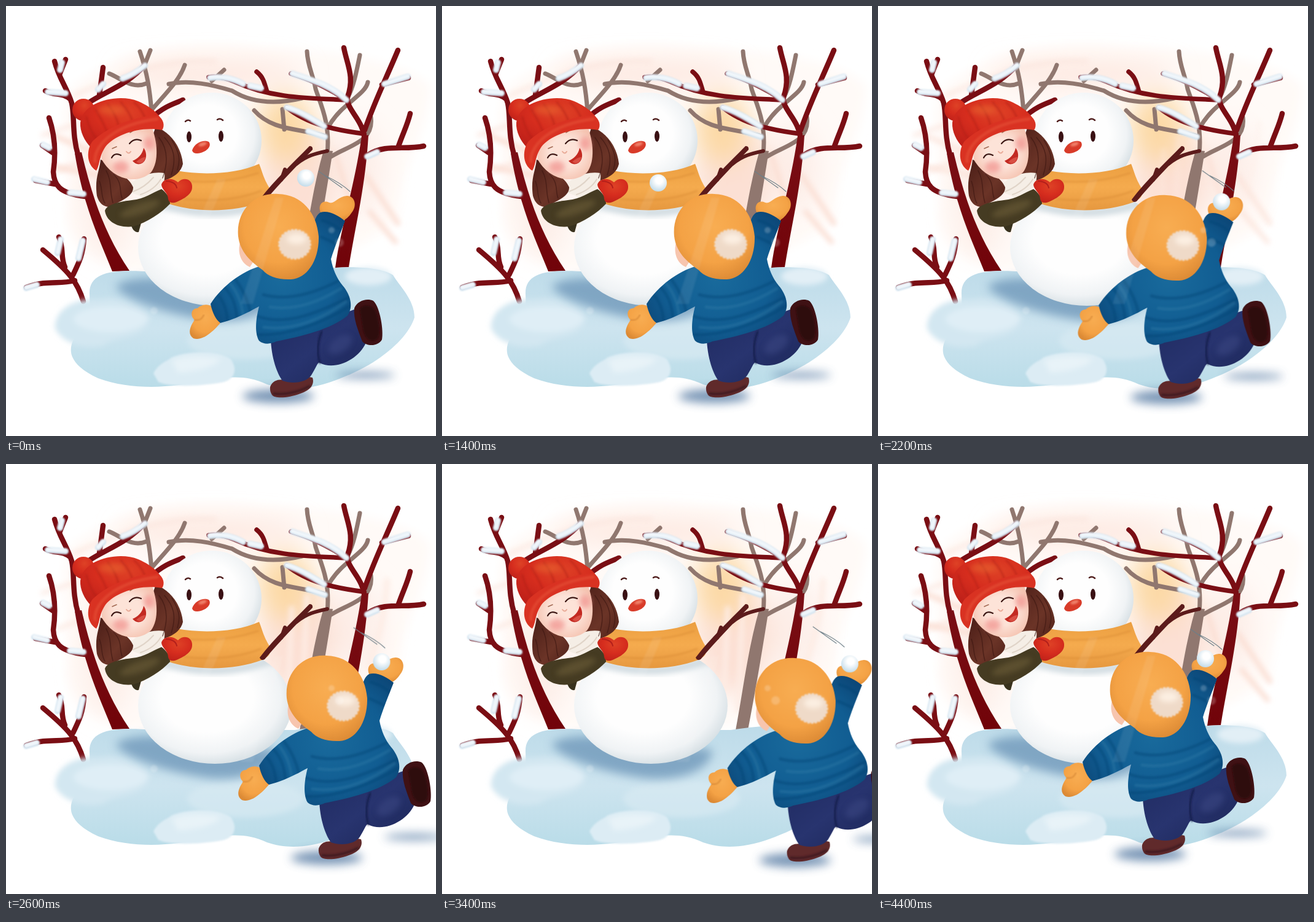
An HTML page that plays this animation: 700x700 px, repeating every 4600 ms.

```html
<!DOCTYPE html>
<html lang="en">
<head>
<meta charset="utf-8">
<title>Snowball fun</title>
<style>
html, body { margin: 0; width: 100%; height: 100%; overflow: hidden; background: #fff; }
svg { display: block; width: 100vw; height: 100vh; }
.line { fill: none; stroke-linecap: round; stroke-linejoin: round; }
.fuzz { filter: url(#b1); }
.blur { filter: url(#b2); }
.soft { filter: url(#b4); }
.softer { filter: url(#b9); }
.haze { filter: url(#b20); }
.boy, .whoosh, .ball, .raysA, .raysB { animation: 4600ms infinite; }
.boy { animation-name: run; }
.whoosh { animation-name: whoosh; }
.ball { animation-name: ball; }
.raysA { animation-name: raysA; }
.raysB { animation-name: raysB; }
/* 200 ms per step: away 2000-3200, back 3200-4400 */
@keyframes run {
  0% { transform: translate(0, 0); animation-timing-function: step-end; }
  43.478%, 95.652%, 100% { transform: translate(0, 0); animation-timing-function: steps(6); }
  69.565% { transform: translate(158px, 12px); animation-timing-function: steps(6); }
}
@keyframes whoosh {
  0% { transform: translate(0, 0); animation-timing-function: step-end; }
  43.478%, 95.652%, 100% { transform: translate(0, 0); animation-timing-function: steps(6); }
  69.565% { transform: translate(114px, -5px); animation-timing-function: steps(6); }
}
@keyframes raysA {
  0%, 43.478%, 95.652%, 100% { opacity: 1; animation-timing-function: steps(3); }
  56.522%, 82.609% { opacity: 0; animation-timing-function: steps(3); }
}
@keyframes raysB {
  0%, 43.478%, 95.652%, 100% { opacity: 0; animation-timing-function: steps(3); }
  56.522%, 82.609% { opacity: 1; animation-timing-function: steps(3); }
}
@keyframes ball {
  0% { transform: translate(488px, 280px); animation-timing-function: step-end; }
  4.348% { transform: translate(439px, 257px); animation-timing-function: step-end; }
  8.696% { transform: translate(390px, 250px); animation-timing-function: step-end; }
  13.043% { transform: translate(341px, 257px); animation-timing-function: step-end; }
  17.391% { transform: translate(292px, 278px); animation-timing-function: step-end; }
  30.435% { transform: translate(352px, 288px); animation-timing-function: step-end; }
  34.783% { transform: translate(412px, 298px); animation-timing-function: step-end; }
  39.13% { transform: translate(473px, 306px); animation-timing-function: step-end; }
  43.478% { transform: translate(533px, 317px); animation-timing-function: steps(6); }
  69.565% { transform: translate(690px, 327px); animation-timing-function: steps(6); }
  95.652% { transform: translate(533px, 317px); animation-timing-function: step-end; }
  100% { transform: translate(488px, 280px); }
}
</style>
</head>
<body>
<svg viewBox="0 0 700 700">
<defs>
  <filter id="b1" x="-10%" y="-10%" width="120%" height="120%"><feGaussianBlur stdDeviation=".8"/></filter>
  <filter id="b2" x="-30%" y="-30%" width="160%" height="160%"><feGaussianBlur stdDeviation="1.8"/></filter>
  <filter id="b4" x="-50%" y="-50%" width="200%" height="200%"><feGaussianBlur stdDeviation="4"/></filter>
  <filter id="b9" x="-60%" y="-80%" width="220%" height="260%"><feGaussianBlur stdDeviation="8"/></filter>
  <filter id="b20" x="-60%" y="-60%" width="220%" height="220%"><feGaussianBlur stdDeviation="20"/></filter>
  <linearGradient id="ice" x1="0" y1="0" x2="0" y2="1"><stop offset="0" stop-color="#bddbe9"/><stop offset=".5" stop-color="#cde4ef"/><stop offset="1" stop-color="#b9dce8"/></linearGradient>
  <radialGradient id="snow" cx=".45" cy=".43" r=".6"><stop offset=".5" stop-color="#fefefe"/><stop offset=".8" stop-color="#f0f3f5"/><stop offset="1" stop-color="#d3dde2"/></radialGradient>
  <radialGradient id="flake" cx=".55" cy=".35" r=".65"><stop offset=".3" stop-color="#fff"/><stop offset="1" stop-color="#c3dcea"/></radialGradient>
  <radialGradient id="skin" cx=".5" cy=".5" r=".55"><stop offset=".5" stop-color="#fde3d8"/><stop offset="1" stop-color="#f5c4b2"/></radialGradient>
  <radialGradient id="red" cx=".55" cy=".3" r=".75"><stop offset="0" stop-color="#de4226"/><stop offset=".5" stop-color="#d62d1e"/><stop offset="1" stop-color="#be2019"/></radialGradient>
  <radialGradient id="orange" cx=".5" cy=".38" r=".65"><stop offset="0" stop-color="#f8ad52"/><stop offset=".65" stop-color="#f4a245"/><stop offset="1" stop-color="#dc8a35"/></radialGradient>
  <linearGradient id="scarf" x1="0" y1="0" x2="0" y2="1"><stop offset="0" stop-color="#eb9e40"/><stop offset=".5" stop-color="#f5ab4e"/><stop offset="1" stop-color="#e6983f"/></linearGradient>
  <radialGradient id="blue" cx=".5" cy=".5" r=".65"><stop offset="0" stop-color="#196a9c"/><stop offset=".6" stop-color="#115d92"/><stop offset="1" stop-color="#0b4474"/></radialGradient>
  <linearGradient id="navy" x1="0" y1="0" x2="1" y2="1"><stop offset="0" stop-color="#1f2a60"/><stop offset=".5" stop-color="#28346f"/><stop offset="1" stop-color="#1b2556"/></linearGradient>
  <linearGradient id="bark" x1="0" y1="0" x2="0" y2="1"><stop offset="0" stop-color="#7a0f15"/><stop offset="1" stop-color="#710309"/></linearGradient>
  <linearGradient id="hair" x1="0" y1="0" x2="1" y2="1"><stop offset="0" stop-color="#4a1d17"/><stop offset=".6" stop-color="#6b3427"/><stop offset="1" stop-color="#4f2119"/></linearGradient>
  <clipPath id="cBody"><ellipse cx="340" cy="393" rx="125" ry="95"/></clipPath>
  <clipPath id="cSweater"><path id="sweater" d="M412 424C385 432 352 455 333 485C336 500 342 511 349 516C370 511 392 500 412 489C406 512 405 533 412 545C420 552 432 550 440 546C480 538 530 526 556 504C566 490 561 470 548 455C538 443 532 428 529 412C535 392 545 368 552 350C541 341 525 332 512 336C505 340 502 349 500 360Z"/></clipPath>
</defs>

<!-- warm sky -->
<path d="M105 135C190 60 330 55 420 68C540 70 660 95 690 130C690 210 640 250 640 345C560 420 420 440 300 440C190 440 105 410 98 340C112 270 75 200 105 135Z" fill="#fffaf7" class="softer"/>
<g class="haze">
  <ellipse cx="335" cy="110" rx="150" ry="18" fill="#fde5dc"/>
  <ellipse cx="165" cy="310" rx="42" ry="100" fill="#fdeee8"/>
  <ellipse cx="475" cy="280" rx="62" ry="95" fill="#fce0d4"/>
  <ellipse cx="575" cy="265" rx="38" ry="75" fill="#fdeee8"/>
  <ellipse cx="455" cy="200" rx="45" ry="58" fill="#fcd9a6"/>
</g>
<path d="M112 145C190 110 260 85 340 90M60 210L115 192M85 268L200 225" class="line soft" stroke="#fbe3da" stroke-width="8" opacity=".6"/>
<path d="M585 275L638 354M592 335L634 384M535 240L565 330M80 262L200 285M75 210L200 262" class="line raysA soft" stroke="#fbdfd4" stroke-width="8"/>
<path d="M465 235L460 360M490 215L482 400M620 190C618 250 600 300 590 330" class="line raysB soft" stroke="#fdece4" stroke-width="8" opacity="0"/>

<!-- far trees -->
<g class="line" stroke="#90776f" stroke-width="7">
  <path d="M237 172C234 135 230 110 218 74M226 95L235 72M238 168C262 140 283 120 291 96M229 126C205 136 188 118 168 110M265 127C300 120 335 128 368 138M335 122L355 104M368 138C400 158 440 160 482 150"/>
  <path d="M523 240C528 190 512 160 504 135C500 112 491 98 490 74M526 195C545 160 585 145 589 124M556 150C566 130 570 110 576 80M522 250C550 228 600 225 594 181M523 213C480 198 435 205 404 170M453 201L450 168"/>
</g>
<path d="M478 433C490 370 498 300 517 235L532 236C522 300 512 360 498 433Z" fill="#90776f"/>

<!-- near trees -->
<path d="M173 432C150 375 126 325 112 240L123 238C140 310 160 370 201 431Z" fill="url(#bark)"/>
<path d="M536 426C545 360 566 300 579 212L590 210C585 295 570 350 558 425Z" fill="url(#bark)"/>
<g class="line" stroke="#7a0e14" stroke-width="8.5">
  <path d="M118 245C107 210 112 180 107 158C98 130 87 120 79 90M87 112L97 87M105 152C92 140 80 147 64 138M113 178C135 145 190 138 225 97M152 145L158 100"/>
  <path d="M129 310C85 305 78 290 77 270C82 235 78 205 70 182M80 290L48 284M78 240L59 227M235 184C255 165 270 160 288 153"/>
  <path d="M126 481C116 448 102 432 60 397M96 425C88 408 95 395 86 376M109 438C120 415 125 405 127 379M112 447C85 454 70 445 33 458"/>
  <path d="M584 222C584 185 553 170 556 148C568 115 555 95 550 68M584 202C600 155 618 120 638 72M612 128L655 117M590 242C618 224 648 235 680 228M639 228C647 205 653 195 658 175"/>
  <path d="M583 208C535 202 490 192 457 165M556 153C490 150 430 150 372 123C355 116 342 114 330 116M425 140C420 122 418 115 408 107M556 154C515 128 490 118 464 110" stroke-width="7.5"/>
</g>
<g class="line fuzz" stroke="#d3e4f0" stroke-width="10">
  <path id="caps" d="M91 92L88 104M68 140L97 142M158 127L150 136M190 118C205 113 215 106 226 97M60 226L70 231M46 282L67 287M104 304L126 306M89 380L84 402M125 382L118 411M33 459L50 454M332 117C350 114 370 118 386 127M397 130L415 134M466 110C500 121 530 130 554 153M457 165C480 172 500 185 518 196M492 204L519 213M616 127L654 115M588 245L604 238"/>
  <use href="#caps" stroke="#f0f6fb" stroke-width="6" transform="translate(0 -1)"/>
</g>

<!-- snowy ground -->
<path d="M136 470C134 432 175 428 240 433H470C530 424 600 420 630 438C640 455 665 478 665 507C655 540 610 580 552 603C500 625 460 628 425 616C390 600 365 604 325 609C280 620 210 628 150 606C105 585 100 563 110 543C130 520 138 500 136 470Z" fill="url(#ice)"/>
<g class="soft">
  <path d="M80 525C78 495 110 475 150 478C190 472 230 485 235 510C220 545 180 535 160 552C130 560 92 550 80 525Z" fill="#d3e7f1"/>
  <ellipse cx="170" cy="510" rx="60" ry="21" fill="#dfeef6"/><ellipse cx="590" cy="440" rx="38" ry="15" fill="#e2eff6"/>
  <ellipse cx="390" cy="545" rx="95" ry="30" fill="#d8eaf3" opacity=".7"/>
</g>
<path d="M240 598C250 580 262 579 270 572C295 562 345 560 366 575C378 592 372 610 350 613C310 620 265 620 248 612Z" fill="#dcecf4" class="blur"/>
<path d="M270 578C290 568 330 568 350 575C335 592 300 595 280 597Z" fill="#e8f3f8" class="soft"/>
<path d="M178 456C200 440 250 440 290 450L440 465C440 500 380 520 320 510C260 500 195 480 178 456Z" fill="#6f98ba" class="softer" opacity=".8"/>

<!-- snowman -->
<ellipse cx="340" cy="393" rx="125" ry="95" fill="url(#snow)"/>
<path d="M240 318Q340 355 440 316" class="line soft" stroke="#d3dde2" stroke-width="14" clip-path="url(#cBody)"/>
<ellipse cx="335" cy="219" rx="81" ry="78" fill="url(#snow)"/>
<path d="M264 265C305 276 370 276 412 257C417 268 418 279 430 298C432 309 427 314 417 319C375 335 310 338 262 321Z" fill="url(#scarf)"/>
<path d="M285 284Q350 292 410 272M290 314Q360 322 415 301" class="line blur" stroke="#d58732" stroke-width="3" opacity=".4"/>
<path d="M413 315C438 282 465 258 494 228Q500 228 499 234C470 264 446 288 421 318Q415 321 413 315Z" fill="#5c1b1b"/>
<path class="line" d="M448 283L454 266M473 257C490 243 505 240 523 236" stroke="#5c1b1b" stroke-width="6"/>
<g fill="#3a1114"><ellipse cx="298" cy="213" rx="4" ry="9"/><ellipse cx="350" cy="212" rx="4" ry="9"/></g>
<path d="M292 188Q296 184 300 187M344 185Q349 182 353 186" class="line" stroke="#51201f" stroke-width="2.5"/>
<path d="M303 235C307 222 322 217 330 221C336 228 326 239 311 240Q304 240 303 235Z" fill="#d83b29"/>
<ellipse cx="320" cy="225" rx="7" ry="3" transform="rotate(-18 320 225)" fill="#f0816a" class="blur"/>

<!-- girl -->
<path d="M203 354L222 346L216 368C210 369 205 364 203 354Z" fill="#39321e"/>
<path d="M244 196C268 207 285 228 288 257C285 270 275 278 258 284C232 290 220 280 225 250Z" fill="url(#hair)"/>
<path d="M195 300C205 280 235 268 258 272C260 292 250 306 222 311Z" fill="#f5eee6"/>
<path d="M207 302Q225 296 240 279M219 307Q242 299 252 282" class="line" stroke="#e0d4c8" stroke-width="2"/>
<path d="M154 250C152 270 144 280 148 309C152 323 160 327 169 327C185 318 208 310 207 295C200 278 180 270 165 255Z" fill="url(#hair)"/>
<path d="M152 285C158 300 154 310 161 321M163 268C173 286 168 300 174 320M175 274C190 288 184 300 189 313M258 214C273 231 278 248 269 275M249 214C264 233 264 255 255 280M270 218C283 240 284 250 279 267" class="line" stroke="#3d1712" stroke-width="1.6" opacity=".6"/>
<path d="M156 250C153 222 185 198 237 196C246 220 250 252 236 271C214 291 175 284 156 250Z" fill="url(#skin)"/>
<g fill="#f29a94" class="soft" opacity=".8"><ellipse cx="187" cy="262" rx="13" ry="10"/><ellipse cx="233" cy="224" rx="9" ry="11"/></g>
<path d="M172 247Q177 238 187 243M201 224Q209 214 220 219" class="line" stroke="#3c1815" stroke-width="2.2"/>
<path d="M173 232L180 229M202 206L210 201" class="line" stroke="#a36a54" stroke-width="1.6"/>
<path d="M196 237Q200 242 203 237" class="line" stroke="#e9ab98" stroke-width="2"/>
<path d="M206 252C214 249 222 242 224 231C231 240 229 254 219 257Q211 259 206 252Z" fill="#c32a22"/>
<path d="M212 254Q220 246 227 246Q225 256 217 256Z" fill="#d94f44"/>
<circle cx="126" cy="169" r="18" fill="url(#red)"/>
<path id="dome" d="M121 190C125 154 185 142 215 155C240 166 252 179 253 188C215 185 160 205 138 230C128 220 120 204 121 190Z" fill="url(#red)"/>
<path d="M131 181Q137 205 149 218M146 169Q159 190 166 209M166 160Q182 181 184 200M187 157Q204 175 207 193M209 157Q224 171 228 188" class="line blur" stroke="#ac1a16" stroke-width="3" opacity=".45"/>
<ellipse cx="171" cy="169" rx="21" ry="8" fill="#e96b32" class="soft" opacity=".5"/>
<path d="M147 268C130 258 131 233 141 220C170 192 220 178 247 178C257 184 259 196 254 202C218 195 177 210 162 229C151 245 153 259 147 268Z" fill="#d93222"/>
<path d="M145 253C143 227 176 193 246 184" class="line blur" stroke="#e85a3c" stroke-width="5" opacity=".45"/>
<path d="M161 333C164 324 180 319 205 316C226 314 238 304 253 298C262 304 267 313 267 322C253 337 230 352 207 359C181 362 163 350 161 333Z" fill="#453b22"/>
<ellipse cx="218" cy="330" rx="34" ry="9" transform="rotate(-20 218 330)" fill="#665836" class="soft" opacity=".7"/>
<path d="M253 291C255 281 270 278 280 287C289 277 304 282 303 295C303 306 291 313 280 318C272 322 265 321 264 314C264 304 254 300 253 291Z" fill="url(#red)"/>
<path d="M261 285Q276 286 278 296" class="line" stroke="#b21f1b" stroke-width="2"/>

<!-- thrower -->
<path d="M509 269L547 296M521 277Q545 288 560 302" class="line whoosh" stroke="#6d7f88" stroke-width="1.1"/>
<g class="boy">
  <g fill="#5b7fa6" class="softer" opacity=".85"><ellipse cx="443" cy="635" rx="58" ry="11"/><ellipse cx="585" cy="601" rx="48" ry="5"/></g>
  <path d="M430 620C434 609 445 607 455 609C470 612 485 601 499 605C503 617 494 626 479 631C460 638 438 640 433 633Q429 627 430 620Z" fill="#602a2b"/>
  <path d="M436 631Q465 634 494 619" class="line blur" stroke="#421b20" stroke-width="4"/>
  <path d="M431 544C433 580 444 602 450 610C469 617 491 611 497 601C506 586 508 578 511 581C535 594 574 576 586 548C579 534 569 520 567 494Z" fill="url(#navy)"/>
  <path d="M514 530C507 546 506 566 511 581" class="line blur" stroke="#151d4b" stroke-width="3"/>
  <ellipse cx="544" cy="551" rx="22" ry="12" transform="rotate(-35 544 551)" fill="#3d4985" class="soft" opacity=".5"/>
  <path d="M567 492C572 480 587 475 598 480C609 490 615 529 612 543C606 554 588 555 580 546C574 530 565 509 567 492Z" fill="#3f1114"/>
  <path d="M576 493C583 484 598 487 603 500C608 520 610 535 604 542C594 549 583 541 581 524Z" fill="#2d0a0b" class="fuzz"/>
  <path d="M335 489C326 483 315 488 312 492C300 492 300 506 307 511C298 524 296 535 305 541C320 546 337 530 349 516Z" fill="url(#orange)"/>
  <path d="M307 511Q318 513 322 503" class="line fuzz" stroke="#d88a38" stroke-width="2"/>
  <path d="M512 336C507 323 516 315 526 320C535 323 540 310 555 309C568 309 572 325 563 336Q556 347 547 350C538 343 524 336 512 336Z" fill="url(#orange)"/>
  <use href="#sweater" fill="url(#blue)"/>
  <g clip-path="url(#cSweater)" class="line blur">
    <path d="M356 458Q374 477 376 509M374 446Q392 470 398 499M346 472Q359 486 361 516M419 470C460 481 505 466 540 448M409 505C460 523 515 495 561 473M410 535C460 537 515 516 559 489M515 349Q534 354 548 368M513 376Q525 381 537 387" stroke="#0a4272" stroke-width="5" opacity=".38"/>
    <path d="M365 452Q383 474 386 505M430 490C475 497 515 478 545 460M420 523C467 529 513 510 553 482" stroke="#3d89b0" stroke-width="5" opacity=".25"/>
  </g>
  <path d="M381 385C377 400 381 418 397 425L412 402Z" fill="#f7c5ae"/>
  <path d="M378 375C374 333 405 303 443 306C482 307 506 337 509 375C510 414 490 444 464 445C443 446 426 440 418 430C398 416 381 400 378 375Z" fill="url(#orange)"/>
  <g class="fuzz">
    <ellipse cx="470" cy="388" rx="25" ry="23" fill="#efdac8"/>
    <ellipse cx="470" cy="388" rx="25" ry="23" class="line" stroke="#efdac8" stroke-width="4" stroke-dasharray="1 5"/>
  </g>
  <ellipse cx="473" cy="379" rx="16" ry="9" fill="#fcefe2" class="soft"/>
</g>

<!-- light -->
<g fill="#fff" class="blur">
  <path d="M344 282L358 282L302 415L282 415ZM438 312L452 312L402 485L382 485Z" opacity=".08"/>
  <g opacity=".2"><circle cx="543" cy="385" r="7"/><circle cx="530" cy="365" r="5"/><circle cx="241" cy="496" r="6"/></g>
</g>
<circle class="ball" r="14" fill="url(#flake)"/>
</svg>
</body>
</html>
```
